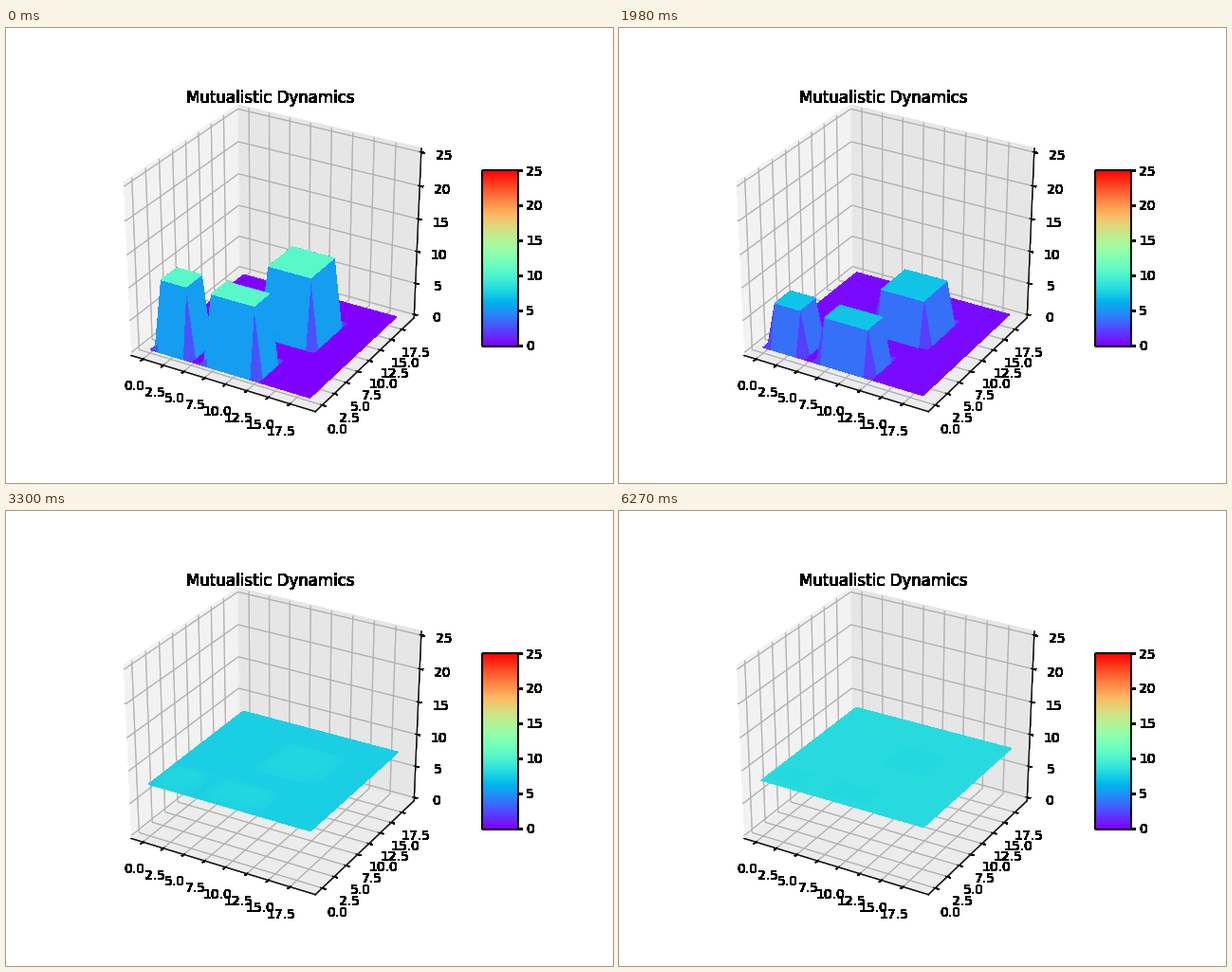
Recreate the animation shown at these times as a matplotlib script. Size 640x480 px, loop 6600 ms.

```python
import numpy as np
import matplotlib.pyplot as plt
from matplotlib.animation import FuncAnimation
from matplotlib.cm import ScalarMappable
from matplotlib.colors import Normalize

W, H, DPI = 640, 480, 100
SIZE, TOP = 20, 25
STEPS, STEP_MS = 20, 330

# Seeded patches as (rows, columns)
PATCHES = [(slice(1, 5), slice(1, 5)),
           (slice(1, 5), slice(7, 13)),
           (slice(9, 15), slice(9, 15))]

X, Y = np.meshgrid(np.arange(SIZE), np.arange(SIZE))


def ground_level(step):
    """Logistic growth towards a slowly shrinking capacity."""
    capacity = 8.3 - 0.03 * (step - 15)
    return capacity / (1 + np.exp(-1.315 * (step - 8.34)))


def patch_level(step):
    """Crash from overcrowding, recover with the partner, then settle."""
    return np.interp(step, [0, 1.5, 4, 5, 7, 10, 13.5, 19],
                     [10.6, 7.4, 6.45, 6.6, 7.45, 7.9, 8.4, 8.05])


def density(step):
    z = np.full((SIZE, SIZE), ground_level(step))
    for area in PATCHES:
        z[area] = patch_level(step)
    return z


def solid(im, dpi):
    """Make every touched pixel fully opaque, keeping its colour."""
    out = np.rint(im * 255).astype(np.uint8)
    out[..., 3] = np.where(out[..., 3] > 0, 255, 0)
    return out, 0, 0


def padded(lo, hi):
    pad = (hi - lo) / 48
    return lo - pad, hi + pad


fig = plt.figure(figsize=(W / DPI, H / DPI), dpi=DPI, facecolor="white")
ax = fig.add_axes([0.125, 0.11, 0.62, 0.77], projection="3d")
ax.apply_aspect = lambda position=None: None  # fill the whole rectangle
ax.set_box_aspect((1, 1, 1), zoom=np.sqrt(3) / 1.8294640721620434)
ax.view_init(elev=30, azim=-60)

margin = 0.05 * (SIZE - 1)
side = padded(-margin, SIZE - 1 + margin)
ax.set_xlim(*side)
ax.set_ylim(*side)
ax.set_zlim(*padded(0, TOP))
ax.set_xticks(np.arange(0, 18, 2.5))
ax.set_yticks(np.arange(0, 18, 2.5))
ax.set_zticks(range(0, TOP + 1, 5))
ax.set_title("Mutualistic Dynamics", y=1.0)

norm = Normalize(0, TOP)
cax = fig.add_axes([501.6 / W, 145.2 / H, 36.96 / W, 184.8 / H])
bar = fig.colorbar(ScalarMappable(norm, "rainbow"), cax=cax)
bar.set_ticks(range(0, TOP + 1, 5))

for a in (ax, cax):
    a.patch.set_visible(False)
    a.set_agg_filter(solid)

surface = None


def draw(step):
    global surface
    if surface is not None:
        surface.remove()
    surface = ax.plot_surface(X, Y, density(step), rstride=1, cstride=1,
                              cmap="rainbow", norm=norm, linewidth=0,
                              antialiased=False)
    return [surface]


anim = FuncAnimation(fig, draw, frames=STEPS, init_func=lambda: draw(0),
                     interval=STEP_MS, repeat=True, repeat_delay=0)
plt.show()
```
